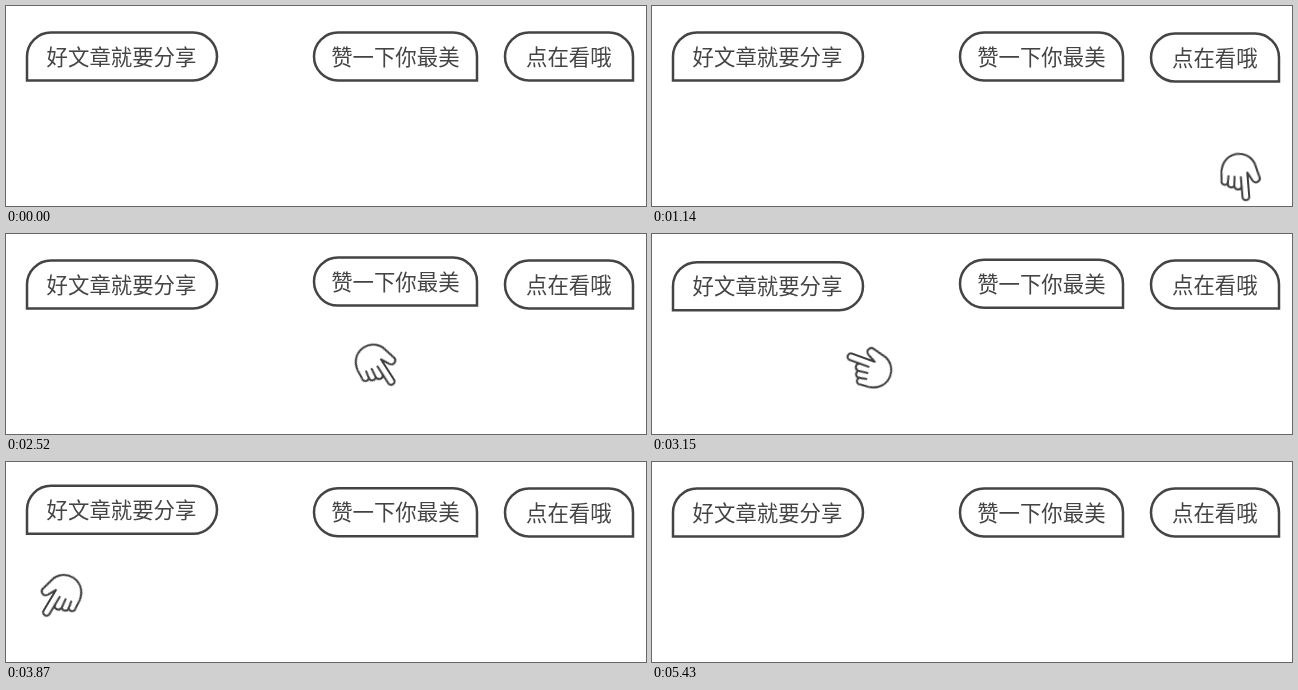
Write an HTML page that moves like this. It is 640 by 200 pixels and loops after 5490 ms.

```html
<!DOCTYPE html>
<html lang="zh-CN">
<head>
<meta charset="utf-8">
<title>分享 点赞 在看</title>
<style>
html, body { margin: 0; width: 100%; height: 100%; overflow: hidden; background: #fff; }
svg { display: block; width: 100%; height: 100%; }
text { font: 21.4px "Noto Sans CJK SC", "Noto Sans CJK", sans-serif; fill: #444; }
.bubble path { fill: #fff; stroke: #444; stroke-width: 2.5; }
.hand { fill: #fff; stroke: #3e3e3e; stroke-width: 2; stroke-linecap: round; stroke-linejoin: round; }

/* every part runs the same cycle, shifted by its start time */
.bubble, .x, .y, .turn {
  animation: bob 5490ms linear calc(var(--start) - 5490ms) infinite;
}
.x { animation-name: slide; }
.y { animation-name: lift; }
.turn { animation-name: turn; }
.c1 { --start: 2940ms; }
.c2 { --start: 1620ms; }
.c3 { --start: 0ms; }

@keyframes bob {
  0%, 1.639% { transform: translateY(0); }
  2.732% { transform: translateY(1px); }
  3.825% { transform: translateY(1.7px); animation-timing-function: ease-in-out; }
  9.107% { transform: translateY(16px); animation-timing-function: cubic-bezier(.37, 0, .63, 1); }
  15.847% { transform: translateY(-3px); animation-timing-function: cubic-bezier(.37, 0, .63, 1); }
  22.4% { transform: translateY(1.7px); animation-timing-function: cubic-bezier(.37, 0, .63, 1); }
  28.96% { transform: translateY(-1px); animation-timing-function: cubic-bezier(.37, 0, .63, 1); }
  35.52% { transform: translateY(.7px); animation-timing-function: cubic-bezier(.37, 0, .63, 1); }
  42.08% { transform: translateY(-.4px); animation-timing-function: ease-in-out; }
  45.5%, 100% { transform: translateY(0); }
}
@keyframes slide {
  0% { transform: translateX(-222px); }
  .546% { transform: translateX(-211px); }
  1.639% { transform: translateX(-193px); }
  2.732% { transform: translateX(-172px); }
  3.825% { transform: translateX(-162px); animation-timing-function: cubic-bezier(.35, .15, .6, 1); }
  10.383%, 14.754% { transform: translateX(0); animation-timing-function: cubic-bezier(.33, 0, .67, .33); }
  24.226%, 100% { transform: translateX(40px); }
}
@keyframes lift {
  0% { transform: translateY(228px); }
  .546% { transform: translateY(193px); }
  1.639% { transform: translateY(163px); }
  2.732% { transform: translateY(141px); }
  3.825% { transform: translateY(136px); }
  10.383% { transform: translateY(135px); animation-timing-function: ease-in-out; }
  14.754% { transform: translateY(125px); animation-timing-function: cubic-bezier(.33, 0, .67, .33); }
  24.226%, 100% { transform: translateY(225px); }
}
@keyframes turn {
  0% { transform: rotate(-40deg); }
  2.732% { transform: rotate(-27deg); }
  3.825% { transform: rotate(-20deg); animation-timing-function: cubic-bezier(.35, .15, .6, 1); }
  10.383% { transform: rotate(47deg); animation-timing-function: ease-in-out; }
  14.754% { transform: rotate(55deg); animation-timing-function: cubic-bezier(.33, 0, .67, .33); }
  24.226%, 100% { transform: rotate(130deg); }
}
</style>
</head>
<body>
<svg viewBox="0 0 640 200">
  <defs>
    <g id="hand" class="hand">
      <path d="M2 -8 L10.4 -12.6 A4 4 0 0 0 7 -19.8 L-7 -16
        A17.5 17.5 0 0 0 -2 17.4 L7.5 18.2
        A3.4 3.4 0 0 0 10.8 12.3 A3.6 3.6 0 0 0 14 6 A3.7 3.7 0 0 0 15.5 -1.2
        L26 -1.2 A3.4 3.4 0 0 0 26 -8 Z"/>
      <path fill="none" d="M15.5 -1.2 H6 M14 6 L5 5 M10.8 12.3 L4 11"/>
    </g>
  </defs>

  <g class="bubble c1">
    <path d="M21 74.5 V50.5 A24 24 0 0 1 45 26.5 H187 A24 24 0 0 1 187 74.5 Z"/>
    <text x="40.6" y="58.8">好文章就要分享</text>
  </g>
  <g class="bubble c2">
    <path d="M471 74.5 V50.5 A24 24 0 0 0 447 26.5 H332 A24 24 0 0 0 332 74.5 Z"/>
    <text x="325.2" y="58.8">赞一下你最美</text>
  </g>
  <g class="bubble c3">
    <path d="M627 74.5 V50.5 A24 24 0 0 0 603 26.5 H523 A24 24 0 0 0 523 74.5 Z"/>
    <text x="520" y="58.8">点在看哦</text>
  </g>

  <g class="c1" transform="translate(60 0) scale(-1 1)">
    <g class="x"><g class="y"><g class="turn"><use href="#hand"/></g></g></g>
  </g>
  <g class="c2" transform="translate(366 0)">
    <g class="x"><g class="y"><g class="turn"><use href="#hand"/></g></g></g>
  </g>
  <g class="c3" transform="translate(571 0)">
    <g class="x"><g class="y"><g class="turn"><use href="#hand"/></g></g></g>
  </g>
</svg>
</body>
</html>
```
